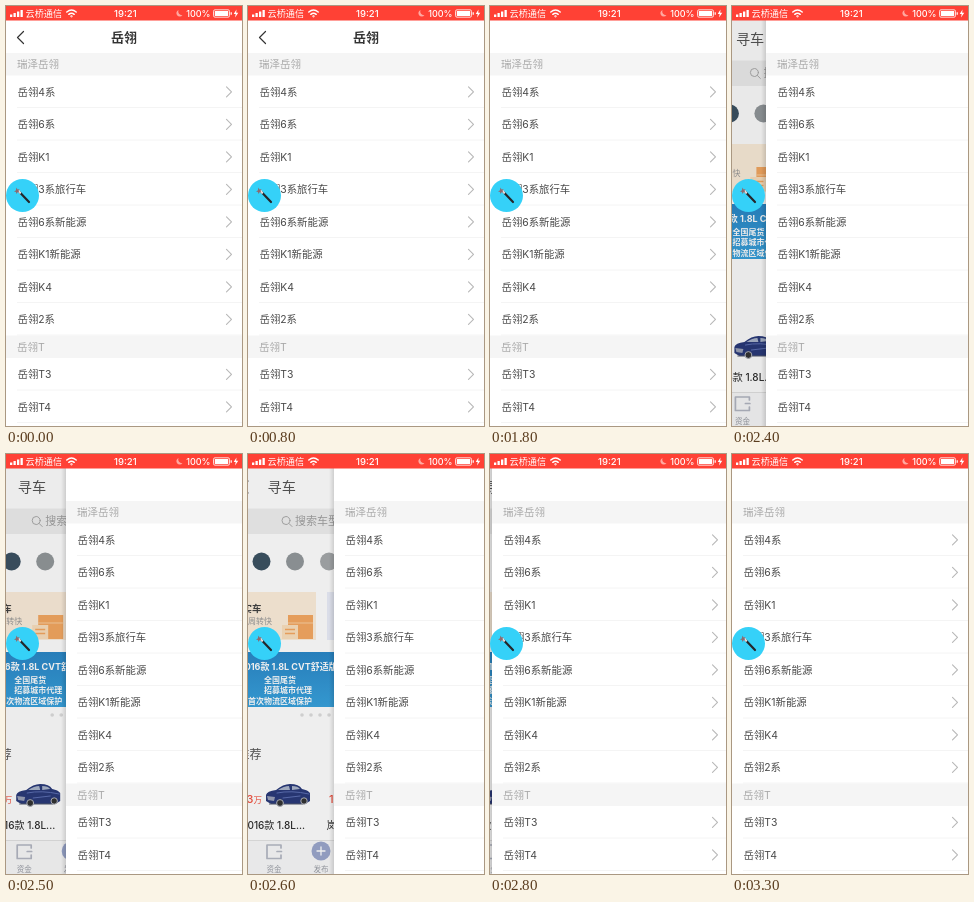
Write an HTML page that moves like this. It is 236x420 px and loops after 3.6 s.

```html
<!DOCTYPE html>
<html lang="zh-CN">
<head>
<meta charset="utf-8">
<title>车系列表</title>
<style>
@property --x { syntax: "<number>"; inherits: true; initial-value: 0; }
html, body { margin: 0; width: 100%; height: 100%; overflow: hidden; background: #fff; }
svg { display: block; width: 236px; height: 420px; }
text { font-family: Inter, "Noto Sans CJK SC", "Noto Sans CJK", sans-serif; white-space: pre; }

/* --x is how far the list has been dragged to the right */
#stage { animation: drag 3.6s step-end infinite; }
#home { transform: translateX(calc((var(--x) - 236) * .3px)); }
#dim { opacity: calc(.1 - var(--x) * .0004); }
#list { transform: translateX(calc(var(--x) * 1px)); }
#bar { animation: vanish 3.6s step-end infinite; }

@keyframes drag {
  0% { --x: 0; }
  61.11% { --x: 3; }
  63.88% { --x: 14; }
  66.66% { --x: 34; }
  69.44% { --x: 60; }
  72.22% { --x: 86; }
  75% { --x: 15; }
  77.77% { --x: 2; }
  80.55%, 100% { --x: 0; }
}
@keyframes vanish {
  0% { opacity: 1; }
  36.11% { opacity: .75; }
  38.88% { opacity: .45; }
  41.66% { opacity: .2; }
  44.44%, 100% { opacity: 0; }
}

.row { font-size: 10.4px; fill: #4a4a4a; }
.head { font-size: 10.5px; fill: #a9a9a9; }
.line { fill: none; stroke-linecap: round; stroke-linejoin: round; }
.status { font-size: 9px; font-weight: 500; fill: #fff; }
.ad { font-size: 8px; font-weight: 700; fill: #fff; }
.price { font-size: 11px; font-weight: 500; fill: #f2503e; }
.price tspan { font-size: 8.5px; }
.car { font-size: 10px; font-weight: 500; fill: #2c2c2c; }
.tab { font-size: 7.5px; fill: #999ca4; text-anchor: middle; }
</style>
</head>
<body>
<svg id="stage" viewBox="0 0 236 420">
  <defs>
    <linearGradient id="shade">
      <stop offset="0" stop-opacity="0"/>
      <stop offset="1" stop-opacity=".13"/>
    </linearGradient>
    <linearGradient id="sky" x2="0" y2="1">
      <stop offset="0" stop-color="#2a87c8"/>
      <stop offset="1" stop-color="#38a2dd"/>
    </linearGradient>
  </defs>

  <g id="home">
    <rect width="236" height="420" fill="#fff"/>
    <path class="line" d="M45 27q-4 6 0 12" stroke="#555" stroke-width="1.2"/>
    <text x="64.5" y="38" font-size="14.2" fill="#555">寻车</text>

    <rect x="10" y="54.5" width="216" height="25.5" rx="2" fill="#efefef"/>
    <g class="line" stroke="#aaa">
      <circle cx="83" cy="66.5" r="4"/>
      <path d="M86 69.500l3 3"/>
    </g>
    <text x="92" y="70.8" font-size="11" fill="#a0a0a0">搜索车型</text>

    <circle cx="58.5" cy="107.5" r="9" fill="#3c5263"/>
    <circle cx="92" cy="107.5" r="9" fill="#93989b"/>
    <circle cx="126" cy="107.5" r="9" fill="#a5a8aa"/>

    <rect x="10" y="138" width="103" height="48" fill="#fdeedb"/>
    <rect x="124" y="138" width="102" height="48" fill="#e9edf8"/>
    <text x="58.5" y="157.5" font-size="9.5" font-weight="700" fill="#444" text-anchor="end">真实车</text>
    <text x="69" y="170" font-size="8" fill="#999" text-anchor="end">周转快</text>
    <path d="M85 161h25v24H85z" fill="#f5a861"/>
    <path d="M85 169h25" stroke="#fbd0a0"/>
    <path d="M79 171h16v14H79z" fill="#fbe0be"/>
    <path d="M82 175.500h10M82 179.500h10" stroke="#f5a861" stroke-width="1.500"/>

    <rect x="10" y="198" width="216" height="55" fill="url(#sky)"/>
    <text x="36" y="215.6" class="ad" style="font-size:9px">2016款 1.8L CVT舒适版</text>
    <text x="61" y="229" class="ad">全国尾货</text>
    <text x="61" y="239.3" class="ad">招募城市代理</text>
    <text x="45" y="250" class="ad">首次物流区域保护</text>
    <g fill="#ddd">
      <circle cx="99" cy="261" r="1.8"/>
      <circle cx="108" cy="261" r="1.8"/>
      <circle cx="117" cy="261" r="1.8"/>
      <circle cx="126" cy="261" r="1.8"/>
    </g>

    <text x="58.5" y="304.5" font-size="12" fill="#555" text-anchor="end">推荐</text>
    <text x="59" y="348.5" class="price" text-anchor="end">9.3<tspan>万</tspan></text>
    <text x="126" y="348.5" class="price">11.2<tspan>万</tspan></text>
    <path d="M63 341q1-4 10-5 7-6 14-6 9 0 12 5 6 1 8 4v8l-5 3H68l-5-3z" fill="#2a3a7a"/>
    <path d="M75 336q6-4 11-4l1 4zM89 332q6 0 8 3l-8 1z" fill="#aab5cb"/>
    <path d="M74 339q14-3 32 1M80 344l17-2" class="line" stroke="#5d70b4"/>
    <path d="M64 342l8 1-1 4-6-1z" fill="#9aa1b8"/>
    <path d="M66 350h34" stroke="#555b6e"/>
    <g fill="#333" stroke="#b5b8c2">
      <circle cx="77" cy="349" r="3.4"/>
      <circle cx="101" cy="347" r="3.2"/>
    </g>
    <text x="102" y="374.8" class="car" text-anchor="end">2016款 1.8L...</text>
    <text x="123.500" y="374.800" class="car">岚语 2017款</text>

    <rect y="386" width="236" height="34" fill="#f9f9fa"/>
    <path d="M0 386.5h236" stroke="#e3e3e3"/>
    <g class="line" stroke="#b4b8c4" stroke-width="1.7">
      <path d="M78 394v-3H64v13.500H78V401"/>
      <path d="M78.500 397.500h-4.500"/>
    </g>
    <text x="71" y="418" class="tab">资金</text>
    <circle cx="118" cy="397" r="9.5" fill="#9ba7cd"/>
    <path class="line" d="M114 397h8M118 393v8" stroke="#fff" stroke-width="1.3"/>
    <text x="118" y="418" class="tab">发布</text>
  </g>
  <rect id="dim" width="236" height="420"/>

  <g id="list">
    <rect x="-5" width="5" height="420" fill="url(#shade)"/>
    <rect width="236" height="420" fill="#fff"/>
    <g id="bar">
      <path class="line" d="M17.500 25.500l-6 6 6 6" stroke="#333" stroke-width="1.2"/>
      <text x="118" y="36" font-size="13" font-weight="700" fill="#333" text-anchor="middle">岳翎</text>
    </g>
    <g id="rows"></g>
  </g>

  <rect width="236" height="14.5" fill="#ff4135"/>
  <path d="M4 8.500h2.300V11H4zM7.500 7h2.300v4H7.500zM11 5.500h2.300V11H11zM14.500 4h2.300v7h-2.300z" fill="#fff"/>
  <text x="19.500" y="10.900" font-size="9.200" fill="#fff">云桥通信</text>
  <g class="line" stroke="#fff" stroke-width="1.5">
    <path d="M60.800 6q4.700-4 9.400 0M62.800 8.300q2.700-2.200 5.400 0"/>
    <circle cx="65.500" cy="10.300" r=".4"/>
  </g>
  <text x="119.300" y="10.900" class="status" style="font-size:9.5px" text-anchor="middle">19:21</text>
  <path d="M172.500 4a3.400 3.400 0 1 0 4 5.200A3.800 3.800 0 0 1 172.500 4z" fill="#ffa8a0"/>
  <text x="204.500" y="10.900" class="status" text-anchor="end">100%</text>
  <rect x="207.500" y="3.800" width="16" height="7.400" rx="1.500" fill="none" stroke="#fff" stroke-width=".8"/>
  <path d="M208.800 5.100h13.400v4.800h-13.400zM224.600 6.200h1.200v2.600h-1.200zM230.500 3.500l-2.800 4.500h2l-.7 3.500 3.300-4.700h-2.100z" fill="#fff"/>

  <circle cx="16.500" cy="189.500" r="16.500" fill="#35d1f8"/>
  <path class="line" d="M13.500 186l9.500 10" stroke="#25262b" stroke-width="2.200"/>
  <path class="line" d="M12.300 184.700l1.800 2" stroke="#e9e4e6" stroke-width="2.200"/>
  <path d="M10.500 181.500l1 2 2-.5-1 2 1 1.500-2-.2-1.200 1.700-.3-2-2-.6 1.800-1z" fill="#8b6a70"/>
</svg>

<script>
const sections = [
  ["瑞泽岳翎", "岳翎4系 岳翎6系 岳翎K1 岳翎3系旅行车 岳翎6系新能源 岳翎K1新能源 岳翎K4 岳翎2系"],
  ["岳翎T", "岳翎T3 岳翎T4"]
];
const HEAD = 22.5, ROW = 32.5;
let y = 47, out = "";

for (const [name, models] of sections) {
  out += `<rect y="${y}" width="236" height="${HEAD}" fill="#f5f5f5"/>
    <text class="head" x="11" y="${y + 15.3}">${name}</text>`;
  y += HEAD;
  for (const model of models.split(" ")) {
    out += `<text class="row" x="11.5" y="${y + 20.4}">${model}</text>
      <path class="line" d="M220.500 ${y + 11.3}l5 5-5 5" stroke="#b8b8b8" stroke-width="1.1"/>
      <path d="M11 ${y + ROW - 0.5}H236" stroke="#f2f2f2" stroke-width=".8"/>`;
    y += ROW;
  }
}
document.getElementById("rows").innerHTML = out;
</script>
</body>
</html>
```
